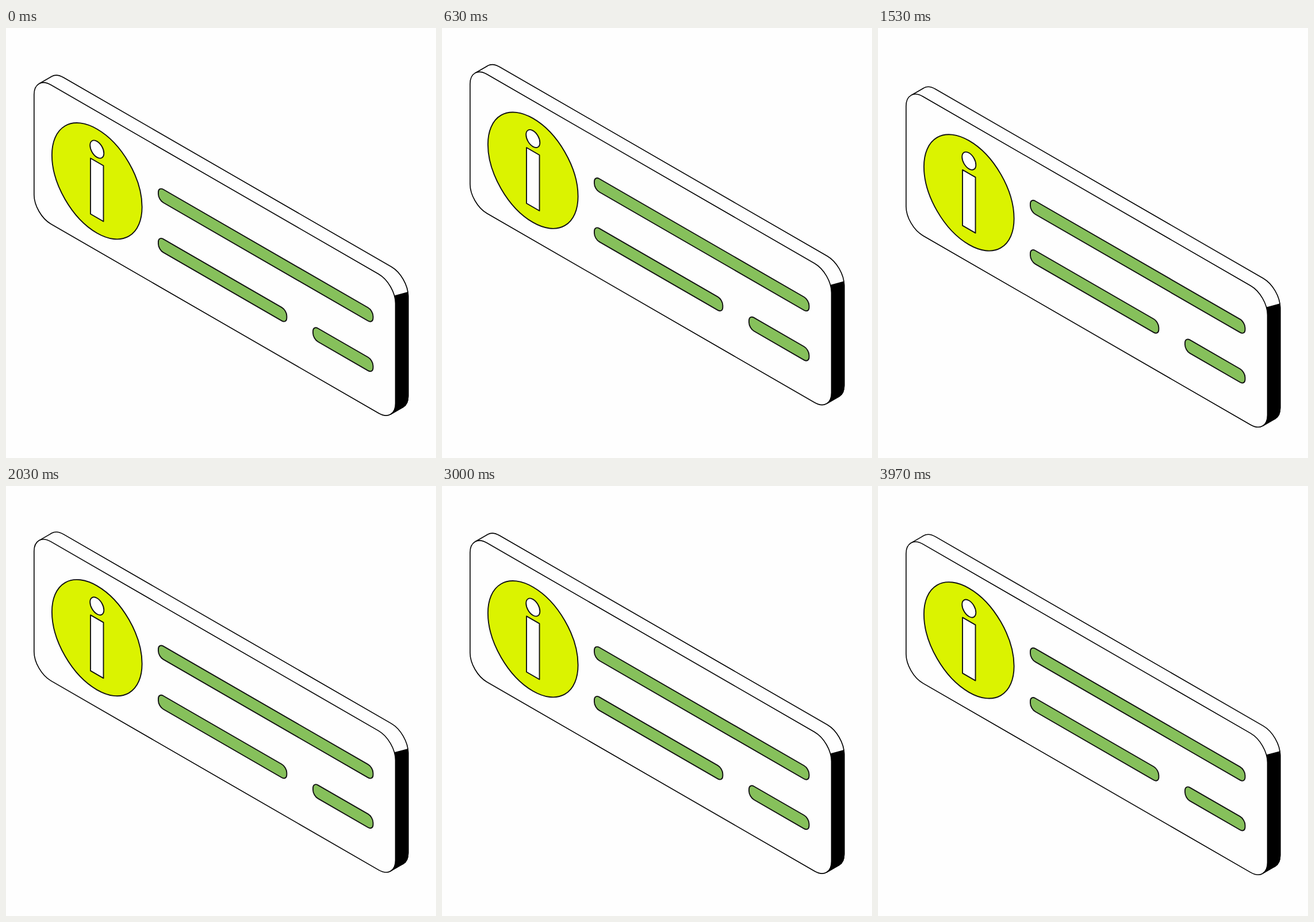
Recreate the animation shown at these times as an HTML page. Size 748 by 748 pixels, loop 4.01 s.

```html
<!DOCTYPE html>
<html lang="en">
<head>
<meta charset="utf-8">
<title>Info card</title>
<style>
  html, body { margin: 0; width: 100%; height: 100%; overflow: hidden; background: #fefefe; }
  svg { display: block; width: 100%; height: 100%; }
  svg * { vector-effect: non-scaling-stroke; }
  #card { fill: #fefefe; stroke: #000; stroke-width: 1.6; stroke-linejoin: round; }
  .detail { stroke: #111; stroke-width: 1.9; }
  .bars { fill: #86c05b; }
</style>
</head>
<body>
<svg viewBox="0 0 748 748">
  <g id="card">
    <!-- isometric plane of the front face -->
    <g transform="matrix(.866 .5 0 1 48.8 82)">
      <rect x="25.5" y="-25.5" width="726" height="242" rx="34"/>
      <path stroke="none" d="M10 10L35.5 -15.5L741.5 206.5L716 232Z"/>
      <path d="M10 10l25.5 -25.5M716 232l25.5 -25.5"/>
      <path fill="#000" d="M723.5 22.5L751 2.3L751.5 8.5V182.5A34 34 0 0 1 741.5 206.5L716 232Z"/>
      <rect width="726" height="242" rx="34"/>
      <g class="detail">
        <circle cx="126.4" cy="121" r="90.5" fill="#dbf300"/>
        <rect id="stem" x="113.4" width="26"/>
        <ellipse id="dot" cx="126.4" rx="13.9"/>
        <g class="bars">
          <rect x="249.6" y="69" width="431.4" height="23" rx="10"/>
          <rect x="249.6" y="155.3" width="258" height="23.3" rx="10"/>
          <rect x="560.3" y="155.3" width="120.7" height="23.3" rx="10"/>
        </g>
      </g>
    </g>
  </g>
</svg>
<script>
  const LOOP = 4010, FPS = 30, LAST = 119;
  const card = document.getElementById('card');
  const stem = document.getElementById('stem');
  const dot = document.getElementById('dot');

  // smooth bump from 0 to 1 and back around a centre time
  const bump = (t, centre, half) =>
    Math.abs(t - centre) < half ? Math.cos((t - centre) / half * Math.PI / 2) ** 2 : 0;

  function set(el, attrs) {
    for (const name in attrs) el.setAttribute(name, attrs[name]);
  }

  function draw(now) {
    const step = Math.min(LAST, Math.floor((now % LOOP + 3.4) * FPS / 1000));
    const t = step / FPS;
    const stretch = bump(t, 3.367, 0.4);
    set(card, { transform: `translate(0 ${-20.3 * Math.sin(Math.PI * t)})` });
    set(stem, { y: 87.8 - 5.7 * stretch, height: 97 + 5.7 * stretch });
    set(dot, { cy: 65.8 + stretch, ry: 13.9 + 3.2 * stretch });
  }

  const start = performance.now();
  function tick() {
    draw(performance.now() - start);
    requestAnimationFrame(tick);
  }
  tick();
</script>
</body>
</html>
```
